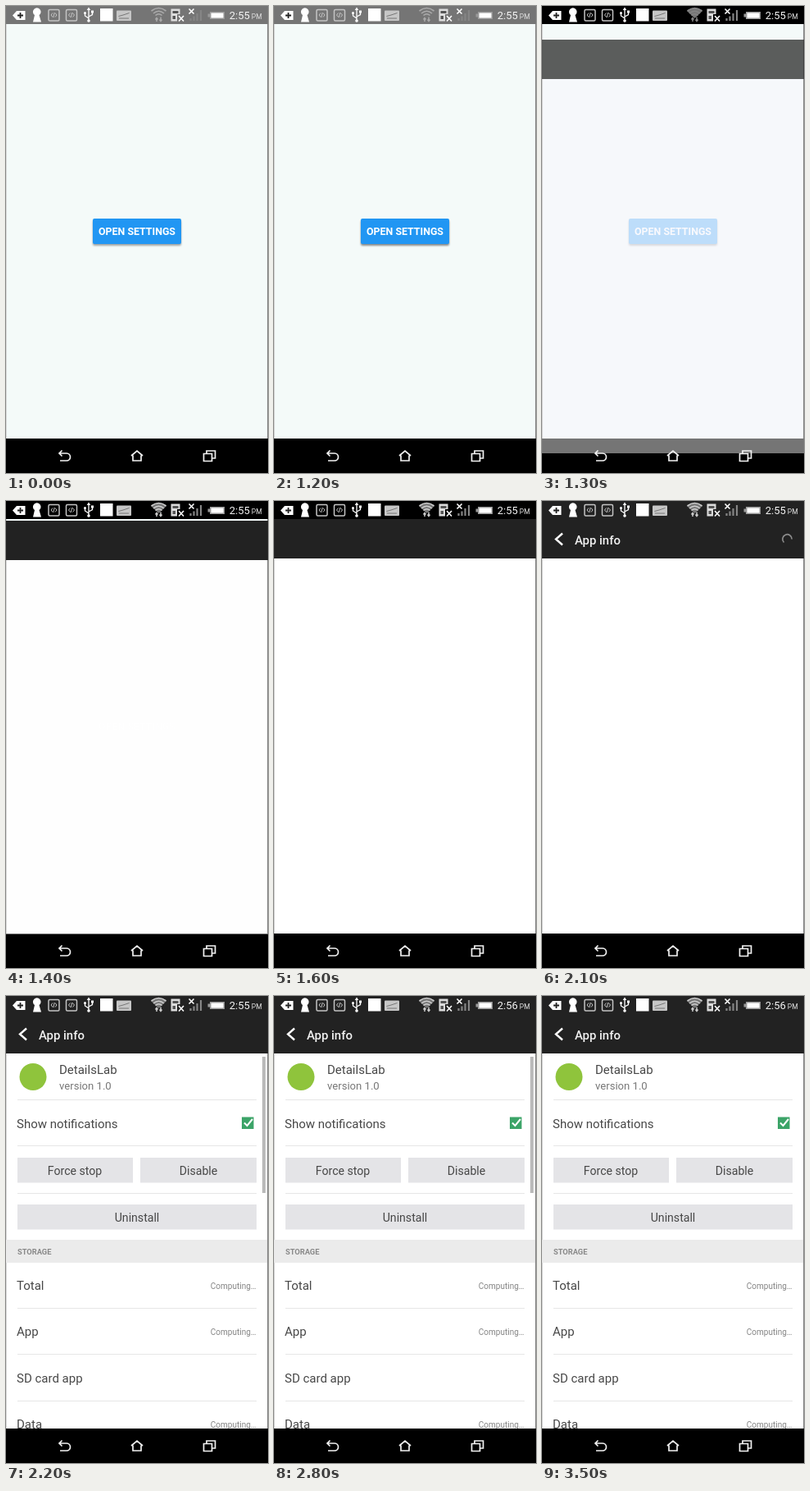
Write an HTML page that moves like this. It is 320 px wide and 569 px high and loops after 3.7 s.

```html
<!DOCTYPE html>
<html lang="en">
<head>
<meta charset="utf-8">
<title>Open settings</title>
<style>
  html, body { margin: 0; width: 100%; height: 100%; overflow: hidden; background: #000; }
  svg { display: block; width: 100%; height: 100%; font-family: Roboto, "Noto Sans", sans-serif; }
  .item { font-size: 15px; fill: #474747; }
  .button { font-size: 14.1px; fill: #474747; text-anchor: middle; }
  .value { font-size: 10px; fill: #858585; text-anchor: end; }
  .line { fill: none; stroke: #e6e6e6; stroke-width: 1; }
  .glyph { fill: none; stroke: #f2f2f2; stroke-width: 1.7; }
</style>
</head>
<body>
<svg viewBox="0 0 320 569" preserveAspectRatio="none">
  <defs>
    <filter id="soft" x="-10%" y="-30%" width="120%" height="170%"><feGaussianBlur stdDeviation="1.3"/></filter>
    <clipPath id="page"><rect y="22" width="320" height="505"/></clipPath>
    <g id="edges">
      <rect width="1" height="505" fill="#d8d8d8"/>
      <rect x="319" width="1" height="505" fill="#8c8c8c"/>
    </g>
  </defs>
  <rect width="320" height="569"/>
  <rect id="strip" y="526" width="320" fill="#757575"/>

  <g id="home" clip-path="url(#page)">
    <rect y="22" width="320" height="505" fill="#f4faf9"/>
    <use href="#edges" y="22"/>
    <rect id="shadow" x="106" y="261" width="108" height="31" rx="2" fill="#000" filter="url(#soft)"/>
    <rect x="106" y="259" width="108" height="31" rx="2" fill="#2196f3"/>
    <text x="160" y="279" text-anchor="middle" font-size="12.4" font-weight="700" fill="#fff">OPEN SETTINGS</text>
  </g>

  <g clip-path="url(#page)">
    <g id="settings">
      <rect id="paper" y="22" width="320" height="548"/>
      <use href="#edges" y="70"/>
      <rect y="22" width="320" height="48" fill="#222"/>
      <g id="title">
        <path d="M25 39.5 17 46.5 25 53.5" fill="none" stroke="#fff" stroke-width="2.4"/>
        <text x="40" y="53" font-size="14.9" font-weight="500" fill="#f2f2f2">App info</text>
      </g>
      <path id="spinner" d="M295.5 50.5A5.7 5.7 0 1 1 305.2 46.500" fill="none" stroke="#8c8c8c" stroke-width="1.700"/>
      <g id="list">
        <circle cx="33" cy="98.5" r="16.5" fill="#8fc43c"/>
        <text class="item" x="65" y="95">DetailsLab</text>
        <text x="65" y="114" font-size="13.1" fill="#777">version 1.0</text>
        <text class="item" x="13" y="161">Show notifications</text>
        <rect x="288" y="147.5" width="14.5" height="14.5" fill="#3ca468"/>
        <path d="M291 154.5 294.5 158 301 150" fill="none" stroke="#fff" stroke-width="2"/>
        <path class="line" d="M14 126.5H306M14 182.5H306M14 240.5H306M14 380.5H306M14 436.5H306M14 493.5H306"/>
        <path d="M14 197H155V227.5H14ZM164 197H306V227.5H164ZM14 254H306V284.5H14Z" fill="#e4e4e7"/>
        <text class="button" x="84" y="218">Force stop</text>
        <text class="button" x="235" y="218">Disable</text>
        <text class="button" x="160" y="275">Uninstall</text>
        <rect y="297" width="319" height="28" fill="#ebebeb"/>
        <text x="14" y="314.5" font-size="9.3" font-weight="700" fill="#888">STORAGE</text>
        <g id="rows"></g>
        <rect id="scrollbar" x="313" y="74" width="4" height="166" fill="#bababa"/>
      </g>
    </g>
  </g>

  <!-- status bar -->
  <rect id="status" width="320" height="22"/>
  <path d="M8 11.5 13 6H23.5V17H13Z" fill="#fff"/>
  <path d="M17.5 8V15M14 11.5H21" stroke="#222" stroke-width="1.8"/>
  <path d="M35 11A4.8 4.8 0 1 1 40.5 11L43 19.5H33Z" fill="#fff"/>
  <g id="code" fill="none" stroke="#c4c4c4">
    <rect x="52" y="4.5" width="13" height="13.5" rx="1.5" stroke-width="1.5"/>
    <path d="M57 8.5 55 11 57 13.5M60 8.5 62 11 60 13.5M59.3 8 57.7 14"/>
  </g>
  <use href="#code" x="21.5"/>
  <g fill="none" stroke="#fff" stroke-width="1.3">
    <path d="M101 4V18M101 15 96.5 12V8.5M101 13 105.5 10.5V7"/>
    <path d="M101 1.5 103.3 5H98.7ZM104 5.5H107V8.5H104Z" fill="#fff" stroke="none"/>
    <circle cx="96.5" cy="8.5" r="1.5" fill="#fff" stroke="none"/>
    <circle cx="101" cy="18" r="1.8" fill="#fff" stroke="none"/>
  </g>
  <rect x="115" y="3" width="15.5" height="15.5" fill="#fff"/>
  <rect x="135" y="5.5" width="18" height="12.5" rx="1" fill="#c6c6c6"/>
  <path d="M137.5 12.5 143 11 150.5 8.5M138 15H150" fill="none" stroke="#777"/>
  <g id="wifi" fill="none" stroke-width="1.6">
    <path d="M177 6Q186.5-1.500 196 6L186.5 15Z" fill="#777" stroke="none"/>
    <path d="M177.5 6Q186.5-1 195.5 6M180 9Q186.5 3.5 193 9M182.5 11.5Q186.5 8 190.5 11.5"/>
    <path d="M184 19V14.5M182.5 16.5 184 14.5 185.5 16.5M189 13.5V18M187.5 16.5 189 18.5 190.5 16.5" stroke-width="1.5"/>
  </g>
  <path d="M201.5 3.5H212.5V10H209V18.5H201.5Z" fill="#ddd"/>
  <path d="M203.5 6H210.5V9H203.5ZM203.5 12H207V16H203.5Z" fill="#555"/>
  <path d="M211 12 217 18.5M217 12 211 18.5M223.5 3.5 229.5 9.5M229.5 3.5 223.5 9.5" stroke="#fff" stroke-width="1.6"/>
  <path d="M225.5 18V15M229.5 18V12.5M233.5 18V9M238 18V5" stroke="#858585" stroke-width="2.2"/>
  <path d="M246.5 9.5H249V7H267V16H249V13.5H246.5Z" fill="#999"/>
  <rect x="250.5" y="8.5" width="15" height="6" fill="#fff"/>
  <text id="clock" x="272.7" y="16" font-size="13" fill="#f2f2f2"></text>
  <text x="299.8" y="16" font-size="8.6" fill="#ddd">PM</text>

  <!-- navigation bar -->
  <path class="glyph" d="M68.5 541.5 65 545 68.5 548.5M65.5 545H74A4.5 4.5 0 0 1 74 554H66"/>
  <path class="glyph" d="M153 548 160 542 167 548M155 547.500V554H165V547.500"/>
  <path class="glyph" d="M241.5 545.5H251.5V554.5H241.5ZM245 545V542H255.5V551H252"/>
</svg>
<script>
const LOOP = 3700, STEP = 100;
const at = id => document.getElementById(id);
const show = (id, on) => at(id).setAttribute("visibility", on ? "inherit" : "hidden");
const clamp = v => Math.max(0, Math.min(1, v));

const rows = [["Total", 358, true], ["App", 414, true], ["SD card app", 471, false], ["Data", 527, true]];
at("rows").innerHTML = rows.map(([label, y, busy]) =>
  `<text class="item" x="13" y="${y}">${label}</text>` +
  (busy ? `<text class="value" x="305.5" y="${y - 1.5}">Computing…</text>` : "")).join("");

// Window entry: alpha decelerates over 200 ms, the slide over 350 ms.
const OPEN = 1245, RISE = 45;
const easeOut = (x, power) => 1 - (1 - clamp(x)) ** power;

function render(time) {
  const t = Math.floor(time / STEP) * STEP;
  const age = t - OPEN, opened = age > 0, titled = t >= 1800;
  const offset = opened ? Math.round(RISE * (1 - easeOut(age / 350, 5))) : 0;
  const alpha = easeOut(age / 200, 4);

  at("settings").setAttribute("opacity", alpha);
  at("settings").setAttribute("transform", `translate(0 ${offset})`);
  at("paper").setAttribute("fill", alpha < .9 ? "#f8f8fd" : "#fff");
  at("strip").setAttribute("height", offset);
  at("status").setAttribute("fill", titled ? "#222" : opened ? "#000" : "#757575");
  at("wifi").setAttribute("stroke", t >= 1400 ? "#ccc" : opened ? "#858585" : "#aaa");
  at("shadow").setAttribute("opacity", t >= 1200 ? .45 : .35);

  show("title", titled);
  show("spinner", titled && t < 2200);
  at("spinner").setAttribute("transform", `rotate(${(t - 2100) * .36} 299.5 46.5)`);
  show("list", t >= 2200);
  at("scrollbar").setAttribute("opacity", clamp((3500 - t) / 200));
  at("clock").textContent = t < 2800 ? "2:55" : "2:56";
}

const start = performance.now();
function tick() {
  render((performance.now() - start) % LOOP);
  requestAnimationFrame(tick);
}
tick();
</script>
</body>
</html>
```
